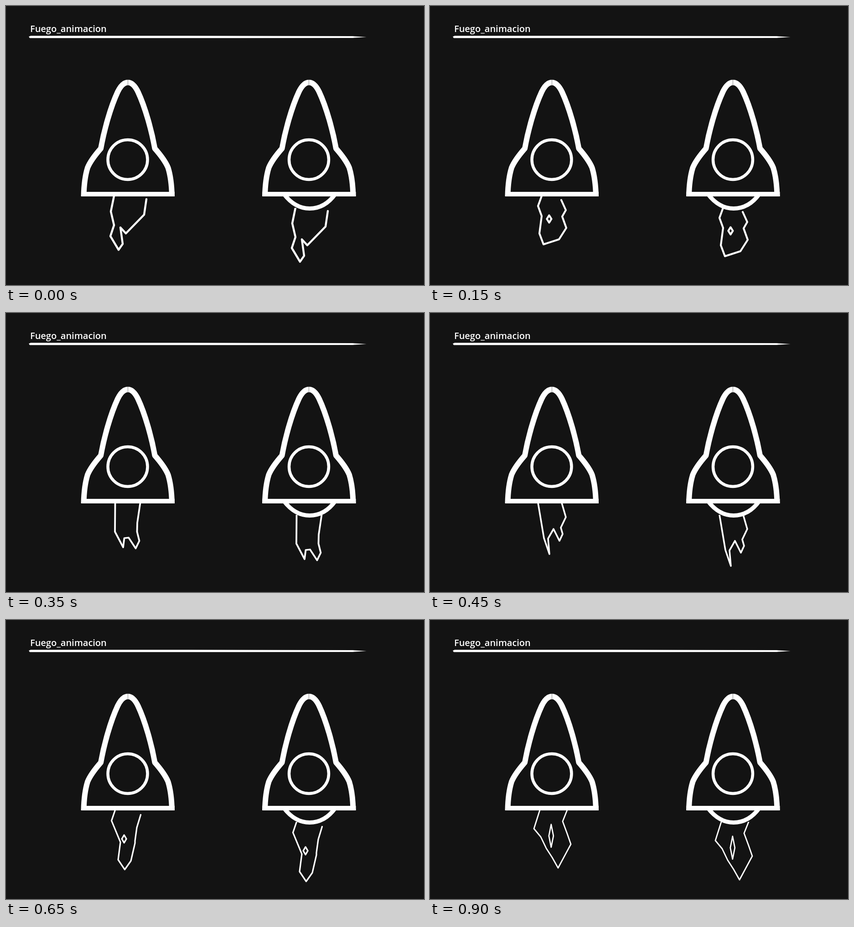
These frames come from a looping animation (917 by 611 pixels, 950 ms). An HTML page:

```html
<!DOCTYPE html>
<html lang="es">
<head>
<meta charset="utf-8">
<title>Fuego_animacion</title>
<style>
  html, body { margin: 0; width: 100%; height: 100%; overflow: hidden; background: #131313; }
  svg { display: block; }
  text { font: 600 20px "Open Sans", sans-serif; fill: #fff; }
</style>
</head>
<body>
<svg width="917" height="611" viewBox="0 0 917 611" fill="none" stroke="#fff" stroke-linejoin="round">
  <defs>
    <path id="side" stroke-width="12" d="M267 167.500Q255 167.500 245 188C229 222 215 273 208 312C194 328 184 342 179 354C174 370 171 392 170.500 416.500"/>
    <g id="rocket">
      <use href="#side"/>
      <use href="#side" transform="matrix(-1 0 0 1 534.500 0)"/>
      <path stroke-width="10" d="M165 412H370"/>
      <circle cx="267" cy="336.500" r="43.500" stroke-width="6.500"/>
    </g>
    <clipPath id="below"><path d="M0 416H917V611H0Z"/></clipPath>
    <g id="flame" clip-path="url(#below)"><path id="fire" stroke-linecap="round"/></g>
  </defs>
  <text x="53" y="57" stroke="none">Fuego_animacion</text>
  <path fill="#fff" stroke="none" d="M50 67L54 65.200H400L760 66L791 68L760 70L400 70.300H52Z"/>
  <use href="#flame"/>
  <use href="#flame" x="398" y="26"/>
  <path stroke-width="9" d="M609 411C628 436 648 443.500 666 443.500S705 436 723 411"/>
  <use href="#rocket"/>
  <use href="#rocket" x="397.500"/>
</svg>
<script>
const STEP = 50, STEPS = 19;

// Key poses: an outline from the left root round the tip to the right root,
// and the height of the slit inside the flame.
const poses = [
  { at: 0, slit: 0, outline: "237,416 230,450 237,480 229,504 247,534 256,521 251,485 263,498 303,457 308,423" },
  { at: 3, slit: 16, outline: "245,416 237,438 245,460 240,498 249,522 283,511 299,486 290,461 298,447 288,425" },
  { at: 5, slit: 0, outline: "242,416 228,465 252,498 260,492 267,511 285,532 294,514 288,488 278,472 300,416" },
  { at: 9, slit: 0, outline: "237,416 250,493 262,528 259,494 271,473 284,499 291,484 287,470 298,447 289,416" },
  { at: 11, slit: 34, outline: "246,416 233,443 244,475 239,514 257,537 276,509 296,474 288,455 284,429 291,416" },
  { at: 15, slit: 0, outline: "233,416 230,436 258,498 253,536 264,556 272,546 270,503 278,512 290,480 300,437" },
  { at: 18, slit: 50, outline: "241,416 228,457 243,475 255,500 268,520 281,543 309,491 301,468 291,441 301,416" }
].map(pose => ({ ...pose, points: pose.outline.split(" ").map(p => p.split(",").map(Number)) }));

const mix = (a, b, t) => a + (b - a) * t;
const mean = values => values.reduce((a, b) => a + b) / values.length;

function flamePath(step) {
  const next = Math.max(1, poses.findIndex(pose => pose.at >= step));
  const a = poses[next - 1], b = poses[next];
  const t = (step - a.at) / (b.at - a.at);
  const points = a.points.map(([x, y], i) => [mix(x, b.points[i][0], t), mix(y, b.points[i][1], t)]);
  const h = mix(a.slit, b.slit, t) / 2;
  const cx = mean(points.map(p => p[0])) - 6, cy = mean(points.map(p => p[1]));
  const slit = h ? `M${cx} ${cy - h}l5 ${h}l-5 ${h}l-5 ${-h}z` : "";
  return "M" + points.join("L") + slit;
}

const fire = document.getElementById("fire");
const start = performance.now();

function tick() {
  const step = Math.floor((performance.now() - start) / STEP) % STEPS;
  fire.setAttribute("d", flamePath(step));
  fire.setAttribute("stroke-width", 4.4 - 0.09 * step);
  requestAnimationFrame(tick);
}
tick();
</script>
</body>
</html>
```
